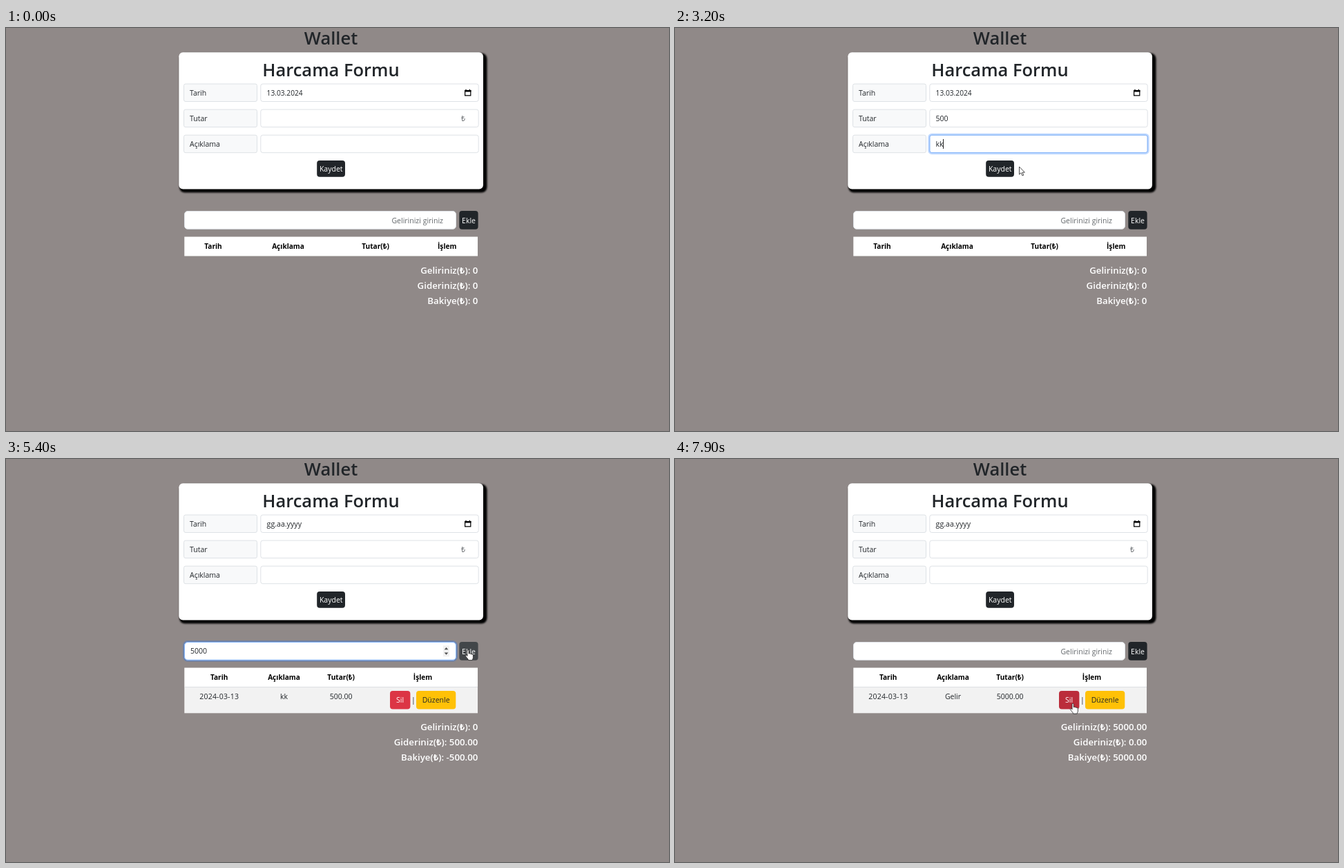
Animation of 960x584 px, one loop 8 s. Source, as an HTML page:

```html
<!DOCTYPE html>
<html lang="tr">
<head>
<meta charset="utf-8">
<title>Wallet</title>
<style>
  html, body { margin: 0; width: 100%; height: 100%; overflow: hidden; background: #908988; }
  svg { display: block; width: 960px; height: 584px; }
  text { font: 10.5px "Open Sans", "Noto Sans", sans-serif; fill: #212529; white-space: pre; }
  .title { font-size: 25.5px; font-weight: 600; }
  .head { font-size: 10.1px; font-weight: 700; fill: #000; }
  .sum { font-size: 13.25px; font-weight: 600; fill: #fff; }
  .light { fill: #fff; }
  .hint { fill: #63676b; }
  .mid { text-anchor: middle; }
  .end { text-anchor: end; }
  .shadow { fill: #000; filter: blur(1.3px); }
  .card { fill: #fff; }
  .label { fill: #f8f9fa; stroke: #dee2e6; }
  .field { fill: #fff; stroke: #dee2e6; }
  .dark { fill: #212529; }
  .ring { fill: none; stroke: #0d6efd; stroke-opacity: .25; stroke-width: 3; }
  .edge { fill: none; stroke: #86b7fe; stroke-width: 1; }
</style>
</head>
<body>
<svg id="stage" viewBox="0 0 960 584"></svg>
<script>
const LOOP = 8000;
const stage = document.getElementById("stage");

function add(parent, tag, attrs, content) {
  const node = document.createElementNS("http://www.w3.org/2000/svg", tag);
  for (const key in attrs) node.setAttribute(key, attrs[key]);
  if (content !== undefined) node.textContent = content;
  parent.appendChild(node);
  return node;
}
const group = (parent = stage) => add(parent, "g", {});
const text = (parent, x, y, content, cls = "") => add(parent, "text", { x, y, class: cls }, content);
const box = (parent, x, y, width, height, rx, cls) =>
  add(parent, "rect", { x, y, width, height, rx, class: cls });
const show = (node, on) => node.setAttribute("visibility", on ? "visible" : "hidden");
const fill = (node, colour) => { node.style.fill = colour; };
const put = (node, value) => { if (node.textContent !== value) node.textContent = value; };
const ramp = (t, start, span) => Math.max(0, Math.min(1, (t - start) / span));

// Text field with focus ring, caret and number spinner
function field(x, y, w, h, radius, pad) {
  const f = { x: x + pad, y: y + h / 2 };
  box(stage, x, y, w, h, radius, "field");
  f.focus = group();
  box(f.focus, x - 1, y - 1, w + 2, h + 2, radius + 1, "ring");
  box(f.focus, x, y, w, h, radius, "edge");
  f.value = text(stage, f.x, f.y + 3.8, "");
  f.caret = add(stage, "rect", { y: f.y - 7, width: 1, height: 14, fill: "#222" });
  f.spin = group();
  const sx = x + w - 14;
  add(f.spin, "rect", { x: sx - 4.5, y: f.y - 8, width: 9, height: 16, fill: "#f1f1f1" });
  add(f.spin, "path", {
    d: `M${sx - 2.8} ${f.y - 2.2}h5.6l-2.8-3.2zM${sx - 2.8} ${f.y + 2.2}h5.6l-2.8 3.2z`, fill: "#505050"
  });
  return f;
}

function setField(f, value, ring, caret, spin) {
  put(f.value, value);
  f.focus.setAttribute("opacity", ring);
  f.caret.setAttribute("x", Math.round(f.x - .5 + (value ? f.value.getComputedTextLength() : 0)));
  show(f.caret, caret);
  show(f.spin, spin);
}

// Form
text(stage, 470.5, 24.3, "Wallet", "title mid");
box(stage, 251, 36.5, 445.5, 202, 8, "shadow");
box(stage, 250.3, 35.3, 440.7, 198.2, 6, "card");
text(stage, 470.5, 69.6, "Harcama Formu", "title mid");
["Tarih", "Tutar", "Açıklama"].forEach((name, i) => {
  const y = 81 + i * 37.1;
  box(stage, 257.5, y, 106, 25.5, 2.5, "label");
  text(stage, 266, y + 16.7, name);
});
const date = field(368.8, 81, 315.4, 25.5, 3, 8.8);
const amount = field(368.8, 118.1, 315.4, 25.5, 3, 8.8);
const note = field(368.8, 155.2, 315.4, 25.5, 3, 8.8);
add(stage, "path", {
  d: "M664.6 90.5h8.2v7.4h-8.2z", fill: "none", stroke: "#000", "stroke-width": 1.2
});
add(stage, "path", { d: "M664 90h9.4v2.4H664zM665.4 88.8h1.2v1.5h-1.2zM670.8 88.8h1.2v1.5h-1.2z" });
const lira = text(stage, 665, 134.9, "₺", "hint end");
const save = box(stage, 450.2, 192, 40.8, 23.8, 4, "dark");
text(stage, 470.7, 207.8, "Kaydet", "light mid");

// Income
const income = field(258.5, 265.5, 393, 25.8, 4.5, 8.5);
const incomeHint = text(stage, 633, 282.6, "Gelirinizi giriniz", "hint end");
const append = box(stage, 656.3, 265, 27.3, 26.7, 4, "dark");
text(stage, 670, 282.7, "Ekle", "light mid");

// Table
add(stage, "rect", { x: 258.3, y: 302.5, width: 424.7, height: 28, fill: "#fff" });
const heads = ["Tarih", "Açıklama", "Tutar(₺)", "İşlem"].map(name => text(stage, 0, 320.2, name, "head mid"));
const WIDE = [300, 408.5, 535, 638.7];
const TIGHT = [308.7, 402.5, 485.2, 603.5];
const STEP = 37.8;

const rows = [0, 1].map(i => {
  const g = group();
  const y = 330.5 + i * STEP;
  add(g, "rect", { x: 258.3, y, width: 424.7, height: STEP, fill: i ? "#fff" : "#f2f2f2" });
  add(g, "rect", { x: 258.3, y: y - .5, width: 424.7, height: .8, fill: "#dee2e6" });
  const cells = [0, 1, 2].map(c => text(g, TIGHT[c], y + 17.8, "", "mid"));
  cells[0].style.letterSpacing = ".2px";
  const del = add(g, "rect", { x: 556, y: y + 5.5, width: 29.4, height: 26.5, rx: 4 });
  text(g, 570.6, y + 22.8, "Sil", "light mid");
  text(g, 589.8, y + 22.5, "|", "mid");
  const edit = add(g, "rect", { x: 594, y: y + 5.5, width: 57.3, height: 26.5, rx: 4 });
  text(g, 622.6, y + 22.8, "Düzenle", "mid");
  return { g, cells, del, edit };
});

const sums = group();
const totals = [0, 1, 2].map(i => text(sums, 683.3, 355.5 + i * 22.1, "", "sum end"));

// Pointers
const arrow = add(stage, "path", {
  d: "M0 0V11.2L2.6 8.8L4.5 13L6.3 12.2L4.4 8.2H7.9Z",
  fill: "#fff", stroke: "#222", "stroke-width": .8, "stroke-linejoin": "round"
});
const hand = add(stage, "path", {
  d: "M0 1C0-.6 2.2-.6 2.2 1V5.2C2.6 4.4 4.2 4.5 4.3 5.6C4.9 4.9 6.3 5.1 6.4 6.2C7.2 5.7 8.4 6 8.4 7.2V10.5C8.4 12.4 7.3 13 7.2 14.6H1.6C1.4 12.7-2 10-2.6 8.2C-2.8 7-1.2 6.6 0 8.4Z",
  fill: "#fff", stroke: "#222", "stroke-width": .8, "stroke-linejoin": "round"
});

// Pointer stops: time, x, y
const PATH = [
  [3000, 530, 176], [3200, 498.5, 201], [3450, 476, 203], [3800, 476, 203],
  [4100, 520, 266], [5150, 640, 279], [5350, 668, 277], [5650, 668, 277],
  [6000, 605.5, 343.5], [6200, 605, 344], [6450, 573.5, 351], [6800, 574, 352.5],
  [7400, 574, 352.5], [7700, 575, 354.5], [8000, 575, 354.5]
];

function pointerAt(t) {
  const i = PATH.findIndex(p => p[0] > t);
  if (i < 1) return null;
  const [a, b] = [PATH[i - 1], PATH[i]];
  const k = (t - a[0]) / (b[0] - a[0]);
  const e = k * k * (3 - 2 * k);
  return { x: a[1] + (b[1] - a[1]) * e, y: a[2] + (b[2] - a[2]) * e };
}

const inside = (p, x, y, w, h) => !!p && p.x > x && p.x < x + w && p.y > y && p.y < y + h;
const typed = (word, times, t) => word.slice(0, times.filter(at => t >= at).length);
const between = (t, a, b) => t >= a && t < b;
const blink = (t, start) => (t - start) % 1000 < 500;

function draw(t) {
  const p = pointerAt(t);
  const saved = t >= 3750;
  const earned = t >= 5590;
  const removed = t >= 6700;

  // Fields
  setField(date, saved ? "gg.aa.yyyy" : "13.03.2024", 0, false, false);
  date.value.style.fontSize = saved ? "10.6px" : "10.2px";
  const sum = saved ? "" : typed("500", [1190, 1290, 1390], t);
  const amountRing = ramp(t, 420, 150) * (1 - ramp(t, 1820, 150));
  setField(amount, sum, amountRing, between(t, 420, 1790) && blink(t, sum ? 1390 : 420), between(t, 420, 1790));
  show(lira, !sum);
  const memo = saved ? "" : typed("kk", [2390, 2590], t);
  const noteRing = ramp(t, 1820, 150) * (1 - ramp(t, 3600, 150));
  const noteStart = t < 2390 ? 1790 : t < 2590 ? 2390 : 2590;
  setField(note, memo, noteRing, between(t, 1790, 3600) && (blink(t, noteStart) || t > 2950), false);
  const pay = earned ? "" : typed("5000", [4690, 4790, 4890, 4990], t);
  const payRing = ramp(t, 4420, 75) * (1 - ramp(t, 5500, 100));
  setField(income, pay, payRing, between(t, 4690, 5500) && blink(t, 4690), between(t, 4420, 5500));
  show(incomeHint, !pay);

  // Table
  const list = [];
  if (saved && !removed) list.push(["2024-03-13", "kk", "500.00"]);
  if (earned) list.push(["2024-03-13", "Gelir", "5000.00"]);
  heads.forEach((h, i) => h.setAttribute("x", (list.length ? TIGHT : WIDE)[i]));
  rows.forEach((row, i) => {
    show(row.g, i < list.length);
    row.cells.forEach((c, j) => put(c, list[i] ? list[i][j] : ""));
    const y = 336 + i * STEP;
    const overDel = inside(p, 556, y, 29.4, 26.5) && !between(t, 6700, 6820);
    const overEdit = inside(p, 594, y, 57.3, 26.5) && t > 6050;
    fill(row.del, overDel ? "#bb2d3b" : "#dc3545");
    fill(row.edit, overEdit ? "#ffca2c" : "#ffc107");
  });
  sums.setAttribute("transform", `translate(0 ${list.length * STEP})`);
  put(totals[0], "Geliriniz(₺): " + (earned ? "5000.00" : "0"));
  put(totals[1], "Gideriniz(₺): " + (removed ? "0.00" : saved ? "500.00" : "0"));
  put(totals[2], "Bakiye(₺): " + (removed ? "5000.00" : earned ? "4500.00" : saved ? "-500.00" : "0"));

  // Buttons and pointer
  const overSave = inside(p, 450, 192, 41, 24);
  const overAdd = inside(p, 656, 265, 28, 27);
  fill(save, overSave ? "#424649" : "#212529");
  fill(append, overAdd ? "#424649" : "#212529");
  const overRow = list.some((_, i) => {
    const y = 336 + i * STEP;
    return inside(p, 556, y, 29.4, 26.5) || inside(p, 594, y, 57.3, 26.5);
  });
  const overField = inside(p, 369, 155, 315, 26) || inside(p, 258, 265, 394, 27);
  const link = overSave || overAdd || overRow;
  show(hand, !!p && link);
  show(arrow, !!p && !link && !overField);
  if (p) for (const c of [hand, arrow]) c.setAttribute("transform", `translate(${p.x} ${p.y})`);
}

const begin = performance.now();
function tick() {
  draw((performance.now() - begin) % LOOP);
  requestAnimationFrame(tick);
}
tick();
</script>
</body>
</html>
```
